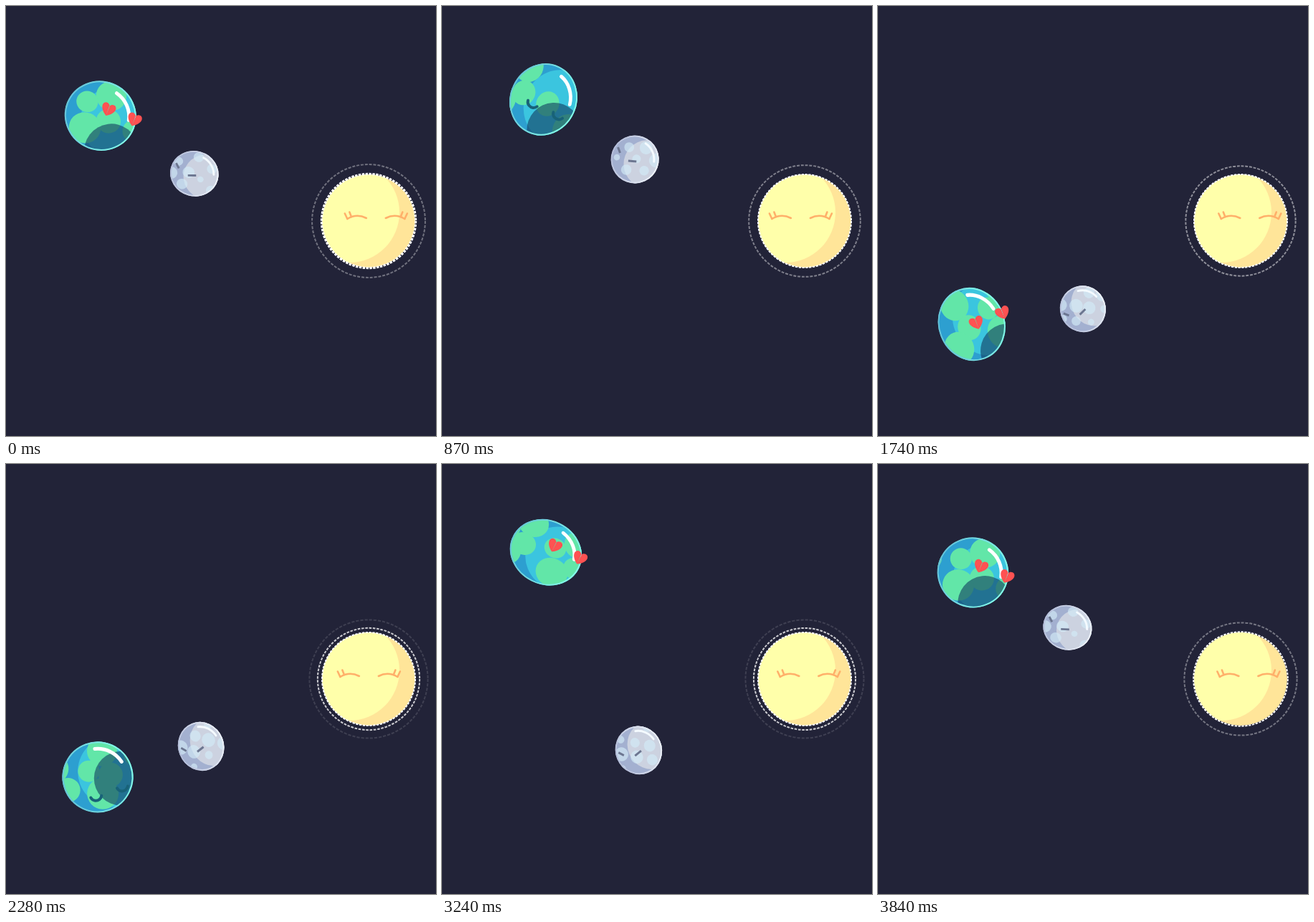
An HTML page with a canvas for the animation above (3870 ms loop, 600 px wide and 600 px high).

```html
<!DOCTYPE html>
<html lang="en">
<head>
<meta charset="utf-8">
<title>Planets</title>
<style>
html, body { margin: 0; width: 100%; height: 100%; overflow: hidden; background: #222338; }
canvas { display: block; width: 100vmin; height: 100vmin; }
</style>
</head>
<body>
<canvas id="stage" width="600" height="600"></canvas>
<script>
const ctx = document.getElementById('stage').getContext('2d');
const LOOP = 3870, HALF = LOOP / 2, TAU = Math.PI * 2, RAD = Math.PI / 180;
const SUN = { x: 506, y: 300, r: 65 };
const mod = (a, n) => ((a % n) + n) % n;
const linear = u => u;
const sine = u => (1 - Math.cos(Math.PI * u)) / 2;

// A value that eases from one [time, value] point to the next.
function track(ease, ...pts) {
  return t => {
    if (t <= pts[0][0]) return pts[0][1];
    const i = pts.findIndex(p => p[0] > t);
    if (i < 0) return pts[pts.length - 1][1];
    const [t0, a] = pts[i - 1], [t1, b] = pts[i];
    return a + (b - a) * ease((t - t0) / (t1 - t0));
  };
}

// Each half loop is one swing: wind up, fly across, wobble to rest.
const START = 700;
const swing = track(sine, [START, -20], [928, -25.8], [1217, 30], [1480, 14.8],
  [1825, 22], [2150, 19.8], [2400, 20]);
const along = track(sine, [START, 1], [1165, 1.1], [1320, .905], [1690, 1.05],
  [2000, .97], [2250, 1]);
const across = track(sine, [START, 1], [1170, .8], [1320, 1.04], [1720, .935],
  [1960, 1.015], [2250, 1]);
const asleep = track(sine, [1100, 1], [1200, 0], [2115, 0], [2215, 1]);

function pose(t) {
  const n = Math.floor((t - START) / HALF);
  const p = START + mod(t - START, HALF);
  return {
    turn: swing(p) * (mod(n, 2) ? 1 : -1) * RAD,
    sx: across(p), sy: along(p), sleep: asleep(p)
  };
}

const LAND_W = 248, SPOT_W = 155;
const landShift = track(linear, [0, 0], [1200, 60], [1740, 125], [2280, 165], [LOOP, LAND_W]);
const row = (y, r, ...xs) => xs.map(x => ({ x, y, r }));
const LAND = [
  ...row(-32, 21, 4, 111, 183),
  ...row(-12, 15, 156, 224),
  ...row(3, 17, 13, 52, 120, 183),
  ...row(24, 22, 95, 164, 234)
];

let seed = 11;
const rand = () => (seed = seed * 16807 % 2147483647) / 2147483647;
const SPOTS = Array.from({ length: 18 }, (_, i) => ({
  x: (i + rand() * .6) * SPOT_W / 18,
  y: mod(i * .618, 1) * 50 - 25,
  r: 4 + 7 * rand()
}));

function disc(x, y, r, fill) {
  ctx.beginPath();
  ctx.arc(x, y, r, 0, TAU);
  ctx.fillStyle = fill;
  ctx.fill();
}

function arc(x, y, r, a, b, color, width) {
  ctx.beginPath();
  ctx.arc(x, y, r, a, b);
  ctx.strokeStyle = color;
  ctx.lineWidth = width;
  ctx.stroke();
}

function line(color, width, x0, y0, x1, y1, lift = 0) {
  ctx.beginPath();
  ctx.moveTo(x0, y0);
  ctx.quadraticCurveTo((x0 + x1) / 2, (y0 + y1) / 2 - lift, x1, y1);
  ctx.strokeStyle = color;
  ctx.lineWidth = width;
  ctx.stroke();
}

function clipDisc(r) {
  ctx.beginPath();
  ctx.arc(0, 0, r, 0, TAU);
  ctx.clip();
}

function orbit(turn, dist) {
  ctx.setTransform(1, 0, 0, 1, SUN.x, SUN.y);
  ctx.rotate(turn);
  ctx.translate(-dist, 0);
}

function scroll(list, width, shift, fill) {
  for (const { x, y, r } of list) {
    disc(mod(x - shift + width / 2, width) - width / 2, y, r, fill);
  }
}

function gloss(r, left, right, shine, width) {
  const rim = ctx.createLinearGradient(-r, 0, r, 0);
  rim.addColorStop(0, left);
  rim.addColorStop(1, right);
  arc(0, 0, r - 1, 0, TAU, rim, 2);
  arc(0, 0, r * .8, -76 * RAD, -13 * RAD, shine, width);
}

function heart(x, y) {
  ctx.beginPath();
  ctx.moveTo(x, y + 9);
  for (const s of [-1, 1]) {
    ctx.moveTo(x, y + 9);
    ctx.bezierCurveTo(x + s * 5, y + 6, x + s * 10, y + 1, x + s * 9.8, y - 4);
    ctx.bezierCurveTo(x + s * 9.4, y - 9.5, x + s * 2.5, y - 10.5, x - s * .3, y - 5);
  }
  ctx.fillStyle = '#ff5252';
  ctx.fill();
}

function drawEarth(t, body, moon) {
  const R = 49.5;
  ctx.save();
  orbit(body.turn, 402);
  ctx.scale(body.sx, body.sy);
  ctx.save();
  clipDisc(R);
  disc(0, 0, R, '#2d9fd0');
  disc(23, 0, R, '#3bc5df');
  scroll(LAND, LAND_W, landShift(t), '#62e6a8');
  orbit(moon.turn, 372);
  disc(0, 0, 38, 'rgba(18,60,95,.6)');
  ctx.restore();
  gloss(R, '#66c3d8', '#86fbe9', '#fff', 5);
  ctx.restore();

  ctx.save();
  orbit(body.turn, 402);
  const x = 26.5 - 18 * body.sleep;
  const y = -5.5 - .3 * body.turn / RAD + 27 * body.sleep;
  for (const side of [-19.5, 19.5]) {
    ctx.globalAlpha = body.sleep;
    arc(x + side, y - 5, 8, .15 * Math.PI, .95 * Math.PI, 'rgb(24,98,120)', 4);
    ctx.globalAlpha = 1 - body.sleep;
    heart(x + side, y);
  }
  ctx.restore();
}

function drawMoon(t, body) {
  const R = 33.5;
  ctx.save();
  orbit(body.turn, 252);
  ctx.scale(body.sx, body.sy);
  ctx.save();
  clipDisc(R);
  disc(0, 0, R, '#a3b0d0');
  disc(19, 0, R, '#ccd2e0');
  scroll(SPOTS, SPOT_W, t / LOOP * SPOT_W, 'rgba(211,236,247,.65)');
  ctx.restore();
  gloss(R, '#b4bdd9', '#edf1f8', '#f4faff', 3);
  ctx.lineCap = 'butt';
  line('#6c7690', 3, -28, -8, -22.5, -1.5);
  line('#6c7690', 3, -8, 5, 3, 2);
  ctx.restore();
}

function drawRings(t) {
  const beat = LOOP / 4, dashes = 84;
  ctx.lineCap = 'butt';
  for (let k = -1; k < 2; k++) {
    const age = mod(t, beat) + k * beat;
    const fade = Math.min(1, 1 - age / 1500);
    if (fade <= 0) continue;
    const r = Math.max(SUN.r, 66.2 + .015 * age - 1.9e-6 * age * age);
    const step = TAU * r / dashes;
    ctx.setLineDash([step * .68, step * .32]);
    arc(0, 0, r, 0, TAU, `rgba(255,255,255,${fade})`, 2);
  }
  ctx.setLineDash([]);
}

function drawSun(t) {
  ctx.save();
  ctx.translate(SUN.x, SUN.y);
  ctx.save();
  clipDisc(SUN.r);
  disc(0, 0, SUN.r, '#ffe599');
  disc(-27, -12, 70, '#ffffaa');
  ctx.restore();
  drawRings(t);

  ctx.translate(3.2 + 9.7 * Math.cos((t - 1705) / HALF * TAU), 0);
  ctx.lineCap = 'round';
  for (const side of [-1, 1]) {
    ctx.save();
    ctx.scale(side, 1);
    line('#ffb06a', 2.6, 13.5, -4, 40, -3, 7.5);
    line('#ffb06a', 2.6, 34.5, -6, 37, -12.5);
    line('#ffb06a', 2.6, 40, -3, 43.5, -10.5);
    ctx.restore();
  }
  ctx.restore();
}

function draw(t) {
  ctx.setTransform(1, 0, 0, 1, 0, 0);
  ctx.fillStyle = '#222338';
  ctx.fillRect(0, 0, 600, 600);
  ctx.lineCap = 'round';
  const moon = pose(t - LOOP / 8);
  drawEarth(t, pose(t), moon);
  drawMoon(t, moon);
  drawSun(t);
}

const begin = performance.now();
function tick() {
  draw(mod(performance.now() - begin, LOOP));
  requestAnimationFrame(tick);
}
tick();
</script>
</body>
</html>
```
